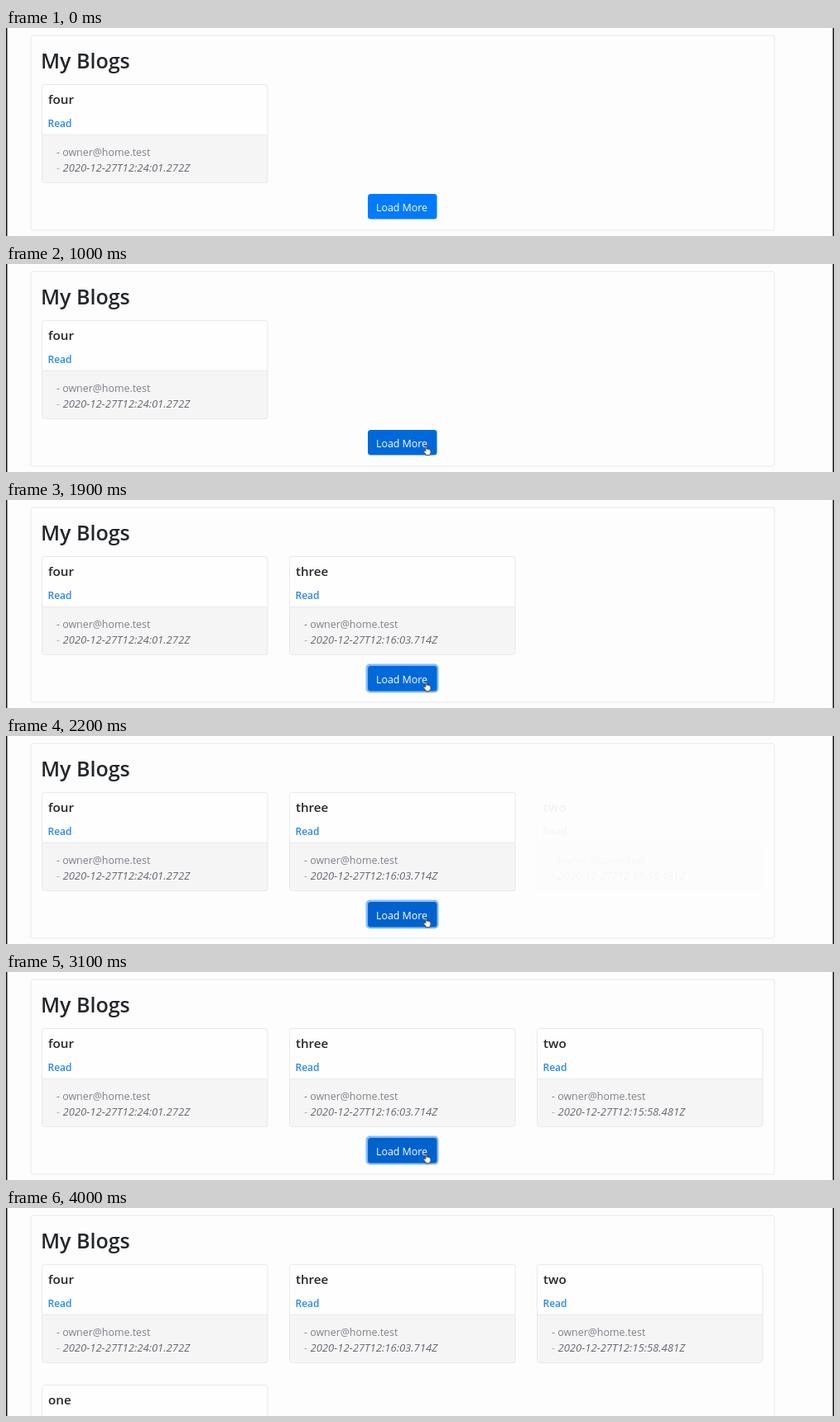
These frames come from a looping animation (1000 px wide and 252 px high, 5 s). An HTML page:

```html
<!DOCTYPE html>
<html lang="en">
<head>
<meta charset="utf-8">
<title>My Blogs</title>
<style>
  html, body { margin: 0; width: 100%; height: 100%; overflow: hidden; background: #fdfdfd; }
  svg { display: block; width: 100%; height: 100%; }
  text { font: 400 12.4px "Open Sans", "Noto Sans", sans-serif; }
  .heading { font-size: 25px; font-weight: 600; fill: #24282c; }
  .title { font-size: 15.2px; font-weight: 600; fill: #25282c; }
  .link { font-size: 12px; font-weight: 600; fill: #2a88f0; }
  .mail { fill: #7c8187; }
  .date { font-size: 13.05px; font-style: italic; fill: #666b71; }
  .dash { fill: #b2b4b8; }
  .label { fill: #fff; }
  .line { fill: none; stroke: #e9e9eb; }
  .frame { stroke: #f0f0f2; stroke-width: 1.5; }

  /* The screen updates ten times a second: 2% of the loop is one step. */
  .late, .pager, .button, .ring, .arrow, .hand {
    animation: 5s step-end infinite;
  }
  .three { animation-name: three; }
  .two { animation-name: two; }
  .one { animation-name: one; }
  .pager { animation-name: pager; }
  .grown { animation-name: grown; }
  .button { animation-name: button; }
  .ring { animation-name: ring; }
  .arrow { animation-name: arrow; }
  .hand { animation-name: hand; }

  @keyframes three { 0% { opacity: 0 } 26% { opacity: .05 } 28% { opacity: .6 } 30%, 100% { opacity: 1 } }
  @keyframes two { 0% { opacity: 0 } 44% { opacity: .05 } 46% { opacity: .6 } 48%, 100% { opacity: 1 } }
  @keyframes one { 0% { opacity: 0 } 64% { opacity: .5 } 66%, 100% { opacity: 1 } }
  @keyframes pager { 0% { opacity: 1 } 64%, 100% { opacity: 0 } }
  @keyframes grown { 0% { opacity: 0 } 64%, 100% { opacity: 1 } }
  @keyframes button {
    0% { fill: #007bff }
    18%, 32%, 50% { fill: #0069d9 }
    24%, 42%, 62%, 100% { fill: #0062cc }
  }
  @keyframes ring { 0% { opacity: 0 } 24%, 100% { opacity: 1 } }
  @keyframes arrow {
    0% { opacity: 0; transform: translate(770px, 243px) }
    8% { opacity: 1; transform: translate(770px, 243px) }
    10% { opacity: 1; transform: translate(704px, 234px) }
    12% { opacity: 1; transform: translate(644px, 226px) }
    14% { opacity: 1; transform: translate(587px, 221px) }
    16% { opacity: 1; transform: translate(538px, 220px) }
    18% { opacity: 0; transform: translate(512px, 220px) }
    74% { opacity: 1; transform: translate(507px, 229px) }
    76% { opacity: 1; transform: translate(507px, 235px) }
    78% { opacity: 1; transform: translate(508px, 240px) }
    80%, 100% { opacity: 0; transform: translate(508px, 252px) }
  }
  @keyframes hand {
    0% { opacity: 0; transform: translate(512px, 221px) }
    18% { opacity: 1; transform: translate(512px, 221px) }
    20% { opacity: 1; transform: translate(508.5px, 220px) }
    74%, 100% { opacity: 0; transform: translate(508.5px, 220px) }
  }
</style>
</head>
<body>
<svg viewBox="0 0 1000 252">
  <defs>
    <g id="card">
      <rect x="43.5" y="68.5" width="272.5" height="119" rx="3" fill="#fefefe"/>
      <path d="M43.5 129.5H316V184.5a3 3 0 0 1-3 3H46.5a3 3 0 0 1-3-3z" fill="#f5f5f6"/>
      <path class="line" d="M43.5 129.5H316"/>
      <rect class="line" x="43.5" y="68.5" width="272.5" height="119" rx="3"/>
      <text class="link" x="50.5" y="120">Read</text>
      <text class="mail" x="61" y="154.5">- owner@home.test</text>
    </g>
  </defs>

  <rect width="1000" height="252" fill="#fdfdfd"/>
  <g class="pager">
    <rect class="line frame" x="30" y="9" width="898" height="236" rx="3"/>
    <rect class="ring" x="434.5" y="198.5" width="88" height="35" rx="5" fill="#85bdfb"/>
    <rect class="button" x="437" y="201" width="83.5" height="30.5" rx="3.5"/>
    <text class="label" x="447" y="221.5">Load More</text>
  </g>
  <rect class="late grown line frame" x="30" y="9" width="898" height="400" rx="3"/>

  <text class="heading" x="42" y="49">My Blogs</text>
  <g>
    <use href="#card"/>
    <text class="title" x="51" y="92">four</text>
    <text class="date" x="61" y="174"><tspan class="dash">-</tspan> 2020-12-27T12:24:01.272Z</text>
  </g>
  <g transform="translate(299 0)"><g class="late three">
    <use href="#card"/>
    <text class="title" x="51" y="92">three</text>
    <text class="date" x="61" y="174"><tspan class="dash">-</tspan> 2020-12-27T12:16:03.714Z</text>
  </g></g>
  <g transform="translate(598 0)"><g class="late two">
    <use href="#card"/>
    <text class="title" x="51" y="92">two</text>
    <text class="date" x="61" y="174"><tspan class="dash">-</tspan> 2020-12-27T12:15:58.481Z</text>
  </g></g>
  <g transform="translate(0 146)"><g class="late one">
    <use href="#card"/>
    <text class="title" x="51" y="91.5">one</text>
  </g></g>

  <path class="arrow" d="M.5 0V8.2L2.4 6.6L3.6 9.4L4.8 8.9L3.6 6.2H6z" fill="#fff" stroke="#333" stroke-width=".8"/>
  <path class="hand" d="M-1.8 6.8V1Q-1.8 0-.9 0T0 1V4.2Q1-.1 0 4.2Q.8 3.5 1.5 4.4Q2.4 3.9 3 4.8Q4.3 4.5 4.3 6V8.5Q4.2 9.8 3.4 10.5V11.8H-1.5V10.6L-4 7.5Q-4.4 6.4-3.4 6.1Q-2.6 6-1.8 6.8z" fill="#fff" stroke="#333" stroke-width=".9"/>

  <rect width="1.5" height="252" fill="#161616"/>
  <rect x="998.5" width="1.5" height="252" fill="#161616"/>
</svg>
</body>
</html>
```
